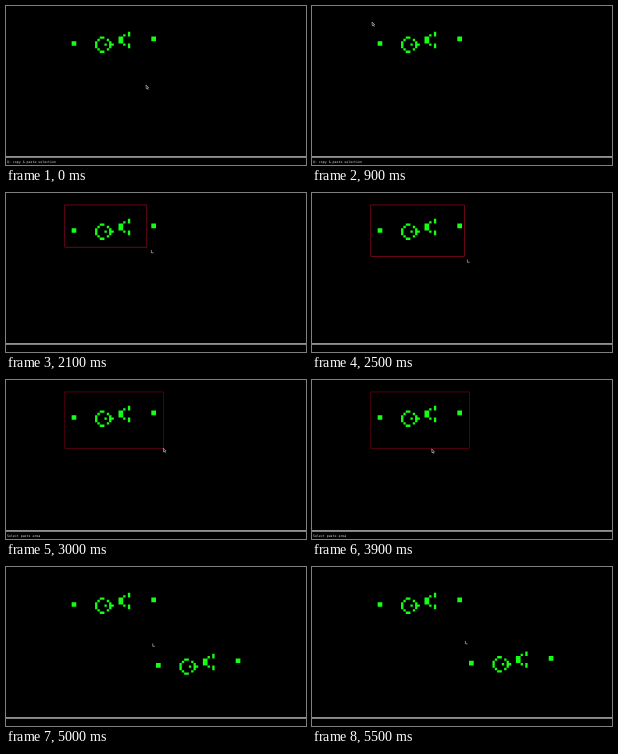
Write an HTML page with a canvas that moves like this. It is 300 px wide and 159 px high and loops after 6000 ms.

```html
<!DOCTYPE html>
<html lang="en">
<head>
<meta charset="utf-8">
<style>
  html, body { margin: 0; height: 100%; overflow: hidden; background: #000; }
  canvas { display: block; }
</style>
</head>
<body>
<canvas id="stage" width="300" height="159"></canvas>
<script>
const ctx = document.getElementById('stage').getContext('2d');
const LOOP = 6000, STEP = 100;
const CELL = 300 / 128;

// Live columns of the Gosper glider gun, row by row
const GUN = [
  [24],
  [22, 24],
  [12, 13, 20, 21, 34, 35],
  [11, 15, 20, 21, 34, 35],
  [0, 1, 10, 16, 20, 21],
  [0, 1, 10, 14, 16, 17, 22, 24],
  [10, 16, 24],
  [11, 15],
  [12, 13],
];
const GUN_POS = [28, 11];
const SEL_START = [25, 5], SEL_END = [67, 29];

// Pointer path: time, x, y
const PATH = [
  [0, 140, 79], [200, 140, 79], [900, 60, 16], [1200, 58.5, 13],
  [1400, 58.5, 13], [1700, 88, 27], [2100, 145, 57], [2500, 155, 66.5],
  [2800, 157.3, 68.2], [3100, 157.3, 68.2], [3800, 120.5, 69],
  [3900, 119.7, 69], [4100, 129, 75], [4200, 129, 75], [4600, 136.6, 75.2],
  [4900, 145, 77], [5500, 153, 74], [LOOP, 153, 74],
];

function pointerAt(t) {
  const i = PATH.findIndex(p => p[0] > t);
  const [t0, x0, y0] = PATH[i - 1], [t1, x1, y1] = PATH[i];
  const k = (t - t0) / (t1 - t0);
  return [x0 + (x1 - x0) * k, y0 + (y1 - y0) * k];
}

const snap = point => point.map(v => Math.floor(v / CELL) - 1);

function drawGun([col, row]) {
  ctx.fillStyle = '#14ff14';
  ctx.beginPath();
  GUN.forEach((cols, y) => cols.forEach(x =>
    ctx.rect((col + x) * CELL, (row + y) * CELL, CELL, CELL)));
  ctx.fill();
}

function drawSelection([right, bottom], color) {
  const [x, y] = SEL_START.map(v => v * CELL);
  const w = right * CELL - x, h = bottom * CELL - y;
  if (w <= 0 || h <= 0) return;
  ctx.strokeStyle = color;
  ctx.lineWidth = 0.5;
  ctx.strokeRect(x + 0.25, y + 0.25, w, h);
}

function drawPointer([x, y], busy) {
  ctx.beginPath();
  if (busy) {
    ctx.moveTo(x + 0.4, y);
    ctx.lineTo(x + 0.4, y + 2.8);
    ctx.lineTo(x + 2.6, y + 2.8);
  } else {
    ctx.moveTo(x, y);
    ctx.lineTo(x + 0.3, y + 3.8);
    ctx.lineTo(x + 1.3, y + 3);
    ctx.lineTo(x + 2.3, y + 4.8);
    ctx.moveTo(x, y);
    ctx.lineTo(x + 2.8, y + 2.8);
    ctx.lineTo(x + 1.3, y + 3);
  }
  ctx.strokeStyle = '#d0d0d0';
  ctx.lineWidth = 0.6;
  ctx.stroke();
}

function drawStatus(text) {
  ctx.fillStyle = '#b4b4b0';
  ctx.fillRect(0, 150.2, 300, 1.5);
  ctx.fillStyle = '#e0e0e0';
  ctx.font = '3.25px "DejaVu Sans Mono", monospace';
  ctx.fillText(text, 1, 157);
}

function draw(now) {
  const t = Math.floor(now % LOOP / STEP) * STEP;
  const pointer = pointerAt(t);
  const dragging = t >= 1500 && t < 2800;
  const pasting = t >= 4000;

  ctx.fillStyle = '#000';
  ctx.fillRect(0, 0, 300, 159);
  drawGun(GUN_POS);
  if (dragging) drawSelection(snap(pointer), '#d00c30');
  else if (t >= 2800 && !pasting) drawSelection(SEL_END, '#a00018');
  if (pasting) {
    const corner = snap(pointer);
    drawGun(GUN_POS.map((v, i) => v - SEL_START[i] + corner[i]));
  }
  drawStatus(t < 1500 ? 'Q: copy & paste selection'
    : t >= 3000 && !pasting ? 'Select paste area' : '');
  drawPointer(pointer, dragging || pasting);
  requestAnimationFrame(draw);
}
requestAnimationFrame(draw);
</script>
</body>
</html>
```
